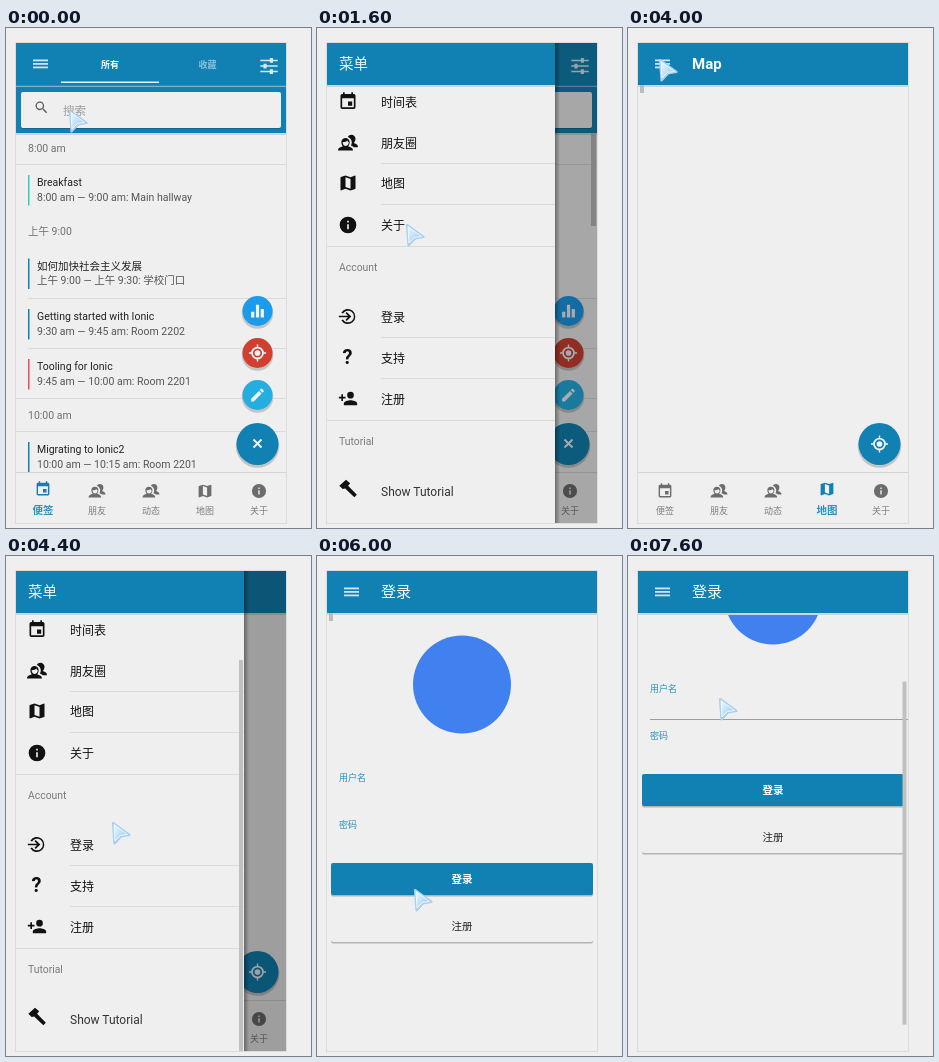
Animation, 305 px wide and 500 px high, one loop 8 s. Source, as an HTML page:

```html
<!DOCTYPE html>
<html lang="zh-CN">
<head>
<meta charset="utf-8">
<style>
html, body { margin: 0; width: 100%; height: 100%; overflow: hidden; background: #efefef; }
svg { display: block; width: 305px; height: 500px; font-family: Roboto, "Noto Sans CJK SC", "Noto Sans CJK", sans-serif; }
</style>
</head>
<body>
<svg viewBox="0 0 305 500">
  <defs>
    <linearGradient id="arrow" x2="1" y2="1"><stop offset=".1" stop-color="#e8f4fd"/><stop offset="1" stop-color="#8fc6ee"/></linearGradient>
    <linearGradient id="edge"><stop stop-opacity=".35"/><stop offset="1" stop-opacity="0"/></linearGradient>
    <clipPath id="phone"><path d="M10 15h270v480H10z"/></clipPath>
  </defs>
  <g id="screen" clip-path="url(#phone)"></g>
  <rect x="9.5" y="14.5" width="271" height="481" fill="none" stroke="#dcdcdc"/>
  <g id="cursor" stroke-linejoin="round">
    <path d="M1 1L17.500 13 9 14.500 2.500 21.500z" fill="none" stroke="#a9d0ee" stroke-width="2.200"/>
    <path d="M2 2.500L15.500 12.500 8.500 13.500 3 19z" fill="url(#arrow)" stroke="#f4faff" stroke-width=".9"/>
  </g>
</svg>
<script>
const BLUE = '#1180b2', BG = '#efefef', LINE = '#dadada';
const screen = document.getElementById('screen');
const cursor = document.getElementById('cursor');

// Icons on a 24 unit grid
const ICONS = {
  event: 'M17 12h-5v5h5zM16 1v2H8V1H6v2H5a2 2 0 0 0-2 2v14a2 2 0 0 0 2 2h14a2 2 0 0 0 2-2V5a2 2 0 0 0-2-2h-1V1zM19 19H5V8h14z',
  people: 'M9 6a5 5 0 0 1 5 5c0 2-1 4-2 5 3 1 6 2 6 5H0c0-3 3-4 6-5-1-1-2-3-2-5a5 5 0 0 1 5-5zM5.500 11c3 0 5-1 6-2 0 1 .5 2 1.500 2-.3 3-2 4.500-3.800 4.500S5.800 14 5.500 11zM16 2a5 5 0 0 1 5 5c0 2-1 4-2 5 3 1 5 2 5 5h-5c-1-1-2-1.500-3.500-2 .5-1 1-2.500 1-4 0-3-2-5.500-4.800-6.300A5 5 0 0 1 16 2z',
  map: 'M20.500 3L15 5.100 9 3 3.400 4.900 3 5.400V20.500l.5.500L9 18.900l6 2.100 5.600-1.900.4-.5V3.500zM15 19l-6-2.100V5l6 2.100z',
  info: 'M12 2a10 10 0 1 0 0 20 10 10 0 0 0 0-20zM13 17h-2v-6h2zM13 9h-2V7h2z',
  locate: 'M12 3a9 9 0 1 0 0 18 9 9 0 0 0 0-18zM12 5.500a6.500 6.500 0 1 1 0 13 6.500 6.500 0 0 1 0-13zM12 8a4 4 0 1 0 0 8 4 4 0 0 0 0-8zM11 0h2v3h-2zM11 21h2v3h-2zM0 11h3v2H0zM21 11h3v2h-3z',
  pencil: 'M3 17.200V21h3.800L17.800 9.900l-3.700-3.700zM20.700 7c.4-.4.4-1 0-1.400l-2.300-2.300c-.4-.4-1-.4-1.400 0l-1.900 1.800 3.800 3.800z',
  bars: 'M3 13h4.500v8H3zM9.800 3h4.500v18H9.800zM16.500 9H21v12h-4.500z',
  addUser: 'M15 12a4 4 0 1 0 0-8 4 4 0 0 0 0 8zM6 10V7H4v3H1v2h3v3h2v-3h3v-2zM15 14c-2.700 0-8 1.300-8 4v2h16v-2c0-2.700-5.300-4-8-4z',
  search: 'M15.500 14h-.8l-.3-.3A6.500 6.500 0 1 0 13.700 14.400l.3.300v.8l5 5 1.500-1.500zM9.500 14a4.500 4.500 0 1 1 0-9 4.500 4.500 0 0 1 0 9z',
  options: 'M1 4h12V2h4v2h6v2h-6v2h-4V6H1zM1 11h4V9h4v2h14v2H9v2H5v-2H1zM1 18h12v-2h4v2h6v2h-6v2h-4v-2H1z',
  hammer: 'M1 8L9 1l5 4-2.500 3L22 19l-3 3L8 11.500 5 12z',
  enter: 'M4 7.500A9 9 0 1 1 4 16.500l2-1a7 7 0 1 0 0-7zM1 11h11L9 8l1.400-1.400L16 12l-5.600 5.400L9 16l3-3H1z'
};

const rect = (x, y, w, h, fill, more = '') => `<rect x="${x}" y="${y}" width="${w}" height="${h}" fill="${fill}" ${more}/>`;
const circle = (x, y, r, fill) => `<circle cx="${x}" cy="${y}" r="${r}" fill="${fill}"/>`;
const text = (s, x, y, size, fill, more = '') => `<text x="${x}" y="${y}" font-size="${size}" fill="${fill}" ${more}>${s}</text>`;
const mid = (s, x, y, size, fill, weight = 400) => text(s, x, y, size, fill, `text-anchor="middle" font-weight="${weight}"`);
const icon = (name, x, y, size, fill) =>
  `<path d="${ICONS[name]}" fill="${fill}" fill-rule="evenodd" transform="translate(${x - size / 2} ${y - size / 2}) scale(${size / 24})"/>`;
const rule = (x, y, w, color = LINE) => rect(x, y, w, 1, color);

const burger = () => [32, 35.500, 39].map(y => rect(27, y - .5, 15, 1.800, '#cfe4ee')).join('');
const header = title => rect(10, 57, 270, 2, '#d0d4d6') + rect(10, 15, 270, 42, BLUE) + burger() + title;

function fab(x, y, r, color, name) {
  return circle(x, y + 2, r + .8, 'rgba(0,0,0,.18)') + circle(x, y, r, color) + (name ? icon(name, x, y, 17, '#eef6fa') : '');
}

function tabs(active) {
  const names = ['便签', '朋友', '动态', '地图', '关于'];
  const icons = ['event', 'people', 'people', 'map', 'info'];
  return rect(10, 444, 270, 51, BG) + rule(10, 444, 270, '#d4d4d4') + names.map((s, i) => {
    const x = 37 + 54 * i, on = i === active;
    return icon(icons[i], x, on ? 461 : 463, 17, on ? BLUE : '#6c6c6c') +
      mid(s, x, 486, on ? 10.500 : 9, on ? '#2b93c2' : '#7d7d7d', on ? 700 : 400);
  }).join('');
}

function schedule() {
  const talk = (y, color, title, info) => rect(22, y - 11, 1.500, 30.500, color) +
    text(title, 31, y, 10.500, '#222') + text(info, 31, y + 14.500, 10.500, '#555');
  const time = (s, y) => text(s, 22, y, 10.500, '#707070');
  return time('8:00 am', 124) + rule(10, 136, 270) +
    talk(158, '#35c9bd', 'Breakfast', '8:00 am — 9:00 am: Main hallway') +
    time('上午 9:00', 207) +
    talk(241.500, BLUE, '如何加快社会主义发展', '上午 9:00 — 上午 9:30: 学校门口') + rule(22, 270, 258) +
    talk(292, BLUE, 'Getting started with Ionic', '9:30 am — 9:45 am: Room 2202') + rule(22, 320, 258) +
    talk(342, '#f0485c', 'Tooling for Ionic', '9:45 am — 10:00 am: Room 2201') + rule(10, 370, 270) +
    time('10:00 am', 391) + rule(10, 403, 270) +
    talk(425, BLUE, 'Migrating to Ionic2', '10:00 am — 10:15 am: Room 2201') +
    rect(10, 105, 270, 2, '#d0d4d6') + rect(10, 57, 270, 48, BLUE) +
    header(mid('所有', 104, 39.500, 9, '#fff', 700) + mid('收藏', 201.500, 39.500, 9, '#8cc2da', 700) +
      rect(55, 53.500, 98, 1.500, '#e4f0f6') + icon('options', 263, 38, 19, '#d8eaf2')) +
    rect(10, 57, 270, 1.500, '#2f8fbb') +
    rect(15, 65, 260, 36, 'rgba(0,0,0,.2)', 'rx="2"') + rect(15, 64, 260, 36, BG, 'rx="2"') +
    icon('search', 35.500, 79.500, 16, '#5c5c5c') + text('搜索', 57, 86.500, 11.500, '#9a9a9a') +
    tabs(0) +
    fab(251.500, 283, 15, '#1c9bea', 'bars') + fab(251.500, 325, 15, '#d04030', 'locate') +
    fab(251.500, 367, 15, '#24aee0', 'pencil') + fab(251.500, 416, 21, BLUE) +
    '<path d="M247.500 411.500l8 8m0-8l-8 8" stroke="#eef6fa" stroke-width="1.800"/>';
}

const map = () => header(text('Map', 64, 41, 15, '#f4fafc', 'font-weight="700"')) +
  rect(12, 57, 4, 8, '#bcbcbc') + tabs(3) + fab(251.500, 416, 21, BLUE, 'locate');

function login({ scroll = 0, underline }) {
  const button = (s, y, bg, color, weight) => rect(14, y + 1.500, 262, 32, 'rgba(0,0,0,.25)', 'rx="2"') +
    rect(14, y, 262, 32, bg, 'rx="2"') + mid(s, 145, y + 19.500, 10.500, color, weight);
  const body = circle(145, 128.500, 49, '#4080ef') +
    text('用户名', 22, 224.500, 9, '#2a8fbd') + text('密码', 22, 271.500, 9, '#2a8fbd') +
    (underline ? rule(22, 252, 258, underline) : '') +
    button('登录', 307, BLUE, '#fff', 700) + button('注册', 354, BG, '#222', 400);
  const bar = scroll ? rect(274.500, 112 + (scroll - 72) * .8, 4, 343, '#c0c0c0') : rect(12, 57, 4, 8, '#bcbcbc');
  return `<g transform="translate(0 ${-scroll})">${body}</g>` +
    header(text('登录', 64, 41, 15, '#f4fafc')) + bar;
}

function menu({ open = 1, bar }, dim) {
  const row = (name, s, y, line) => icon(name, 31, y - 5, 20, '#111') +
    text(s, 64, y, 12, '#111') + (line ? rule(64, line, 174) : '');
  const label = (s, y) => text(s, 22, y, 10.400, '#7a7a7a');
  return rect(10, 15, 270, 480, `rgba(0,0,0,${dim * open})`) +
    `<g transform="translate(${-228 * (1 - open)} 0)">` +
    rect(238, 15, 5, 480, 'url(#edge)') + rect(10, 15, 228, 480, BG) +
    rect(10, 57, 228, 2, '#d0d4d6') + rect(10, 15, 228, 42, BLUE) + text('菜单', 22, 40.500, 14.500, '#e9f4f8') +
    row('event', '时间表', 78.500) + row('people', '朋友圈', 120, 135) +
    row('map', '地图', 160, 176) + row('info', '关于', 202) + rule(10, 218, 228) +
    label('Account', 243) + row('enter', '登录', 293.500, 309) +
    text('?', 25.500, 336, 20, '#111', 'font-weight="700"') + text('支持', 64, 334.500, 12, '#111') + rule(64, 350, 174) +
    row('addUser', '注册', 375.500) + rule(10, 392, 228) +
    label('Tutorial', 417) + icon('hammer', 31.500, 461, 20, '#111') + text('Show Tutorial', 64, 468, 12, '#333') +
    (bar ? rect(233, 104, 4, 391, '#c0c0c0') : '') + '</g>';
}

const scheduleMenu = o => schedule() + rect(274, 105, 5, 93, '#bbb') + menu(o, .3);
const mapMenu = o => map() + menu(o, .34);

// One pose every 400 ms: view, cursor position, view options
const STEP = 400;
const POSES = [
  [schedule, 63, 82], [schedule, 33, 37],
  [scheduleMenu, 33, 37, { open: .55 }], [scheduleMenu, 113, 190], [scheduleMenu, 89, 196],
  [map, 129, 226], [map, 129, 226], [map, 134, 234], [map, 19, 73], [map, 22, 33], [map, 31, 31],
  [mapMenu, 106, 266, { bar: true }], [mapMenu, 97, 293], [mapMenu, 77, 332], [mapMenu, 72, 285],
  [login, 97, 333], [login, 111, 232],
  [login, 108, 221, { scroll: 72, underline: '#62addb' }],
  [login, 93, 152, { scroll: 89, underline: '#9c9c9c' }],
  [login, 91, 142, { scroll: 89, underline: '#9c9c9c' }]
];

let shown = -1;
const start = performance.now();
function tick() {
  const i = Math.floor((performance.now() - start) / STEP) % POSES.length;
  if (i !== shown) {
    const [view, x, y, options = {}] = POSES[i];
    screen.innerHTML = view(options);
    cursor.setAttribute('transform', `translate(${x} ${y})`);
    shown = i;
  }
  requestAnimationFrame(tick);
}
tick();
</script>
</body>
</html>
```
